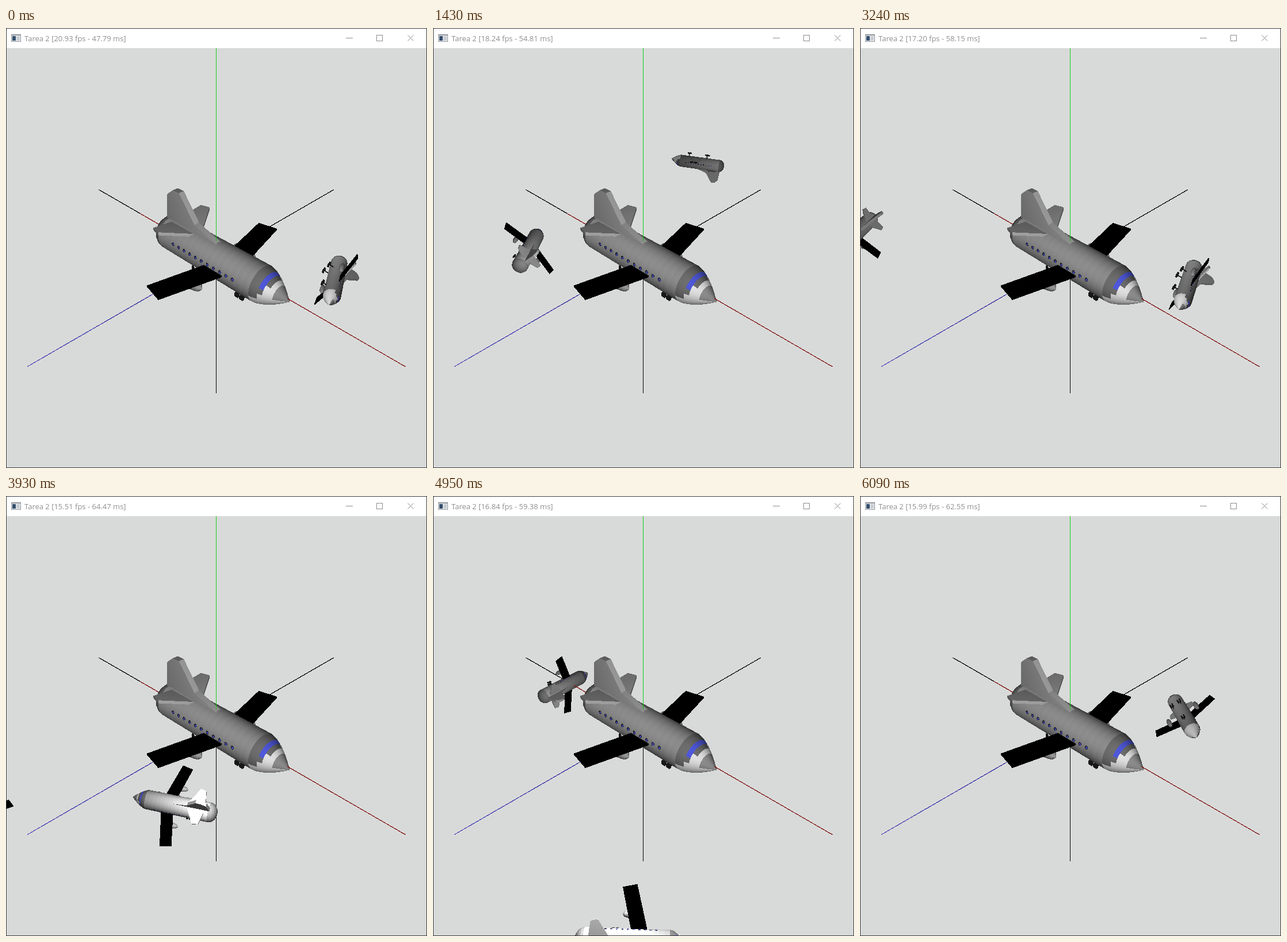
Write an HTML page with a canvas that moves like this. It is 732 px wide and 765 px high and loops after 6.14 s.

```html
<!DOCTYPE html>
<html lang="es">
<head>
<meta charset="utf-8">
<title>Tarea 2</title>
<style>
  html, body { margin: 0; width: 100%; height: 100%; overflow: hidden; background: #fff; }
  canvas { display: block; }
</style>
</head>
<body>
<canvas id="stage" width="732" height="765"></canvas>
<script>
const W = 732, H = 765, TOP = 35, LOOP = 6140;
const ctx = document.getElementById('stage').getContext('2d');

// ---------- helpers ----------
const sub = (a, b) => a.map((v, i) => v - b[i]);
const dot = (a, b) => a[0] * b[0] + a[1] * b[1] + a[2] * b[2];
const cross = (a, b) => [a[1] * b[2] - a[2] * b[1], a[2] * b[0] - a[0] * b[2], a[0] * b[1] - a[1] * b[0]];
const unit = a => { const l = Math.hypot(...a) || 1; return a.map(v => v / l); };
const rad = d => d * Math.PI / 180;
const mix = (a, b, u) => a + (b - a) * u;
const sample = (n, fn) => Array.from({ length: n + 1 }, (_, i) => fn(i / n));

// ---------- plane model: x forward, y up, z sideways ----------
const gray = (v, ambient) => ({ rgb: [v, v, v], ambient });
const BLACK = gray(0, 1), TYRE = gray(18, 1), METAL = gray(150, .3), TAIL = gray(190, .3);
const DARK = gray(90, .4), LIGHT = gray(165, .55), TIP = gray(110, .5);
const BLUE = { rgb: [52, 58, 142], ambient: .7 };
const mesh = [];

function face(pts, normals, color) {
  for (let i = 2; i < pts.length; i++) {
    mesh.push({ p: [pts[0], pts[i - 1], pts[i]], n: [normals[0], normals[i - 1], normals[i]], color });
  }
}

// Solid between two matching outlines, flat shaded
function prism(lower, upper, color) {
  const all = [...lower, ...upper];
  const mid = [0, 1, 2].map(k => all.reduce((s, p) => s + p[k], 0) / all.length);
  const flat = pts => {
    let n = unit(cross(sub(pts[1], pts[0]), sub(pts[2], pts[0])));
    if (dot(n, sub(pts[0], mid)) < 0) n = n.map(v => -v);
    face(pts, pts.map(() => n), color);
  };
  flat(lower);
  flat(upper);
  lower.forEach((p, i) => {
    const j = (i + 1) % lower.length;
    flat([p, lower[j], upper[j], upper[i]]);
  });
}

// Outline thickened along one axis
function slab(outline, axis, below, above, color) {
  const shifted = d => outline.map(p => p.map((v, k) => k === axis ? v + d : v));
  prism(shifted(-below), shifted(above), color);
}

function box([x, y, z], [a, b, c], color) {
  slab([[x - a, y, z - c], [x + a, y, z - c], [x + a, y, z + c], [x - a, y, z + c]], 1, b, b, color);
}

// Surface of revolution along x; rings are [x, radius, y]
function lathe(rings, colorOf, z = 0, sides = 36) {
  for (let i = 0; i + 1 < rings.length; i++) {
    const [A, B] = [rings[i], rings[i + 1]];
    const slope = (B[1] - A[1]) / (B[0] - A[0]);
    const at = (q, a) => [q[0], q[2] + q[1] * Math.cos(a), z + q[1] * Math.sin(a)];
    const normal = a => unit([-slope, Math.cos(a), Math.sin(a)]);
    for (let s = 0; s < sides; s++) {
      const [a, m, b] = [s, s + .5, s + 1].map(v => rad(v * 360 / sides - 180));
      face([at(A, a), at(B, a), at(B, b), at(A, b)],
        [normal(a), normal(a), normal(b), normal(b)], colorOf(i, Math.abs(m) * 180 / Math.PI));
    }
  }
}

function porthole(x, side, lift, size, color) {
  const a = rad(78), n = [0, Math.cos(a), side * Math.sin(a)], t = [0, -Math.sin(a), side * Math.cos(a)];
  const pts = sample(8, u => {
    const c = size * Math.cos(u * 2 * Math.PI), s = size * Math.sin(u * 2 * Math.PI);
    return [x + c, n[1] * lift + t[1] * s, n[2] * lift + t[2] * s];
  });
  face(pts, pts.map(() => n), color);
}

function noseColor(ring, angle) {
  if (ring < 2) return angle < 105 ? DARK : LIGHT;
  if (ring === 2) return angle < 58 ? BLUE : angle < 85 ? DARK : LIGHT;
  if (ring === 3) return angle < 45 ? DARK : LIGHT;
  return ring === 4 || angle > 90 ? LIGHT : TIP;
}

function buildPlane() {
  lathe(sample(6, u => [-2.3 - .5 * Math.cos(u * Math.PI / 2), .65 * Math.sin(u * Math.PI / 2), 0]), () => METAL);
  lathe(sample(16, u => [mix(-2.3, 2.05, u), .65, 0]), i => gray(mix(205, 135, i / 15), .3));
  lathe(sample(8, u => [mix(2.05, 3.18, u), .65 * (1 - u ** 1.5), -.08 * u]), noseColor);

  slab([[-2.4, .5, 0], [-2.32, 1.6, 0], [-2, 1.87, 0], [-1.68, 1.88, 0], [-.95, .95, 0], [-.9, .5, 0]], 2, .11, .11, TAIL);
  slab([[-1, .5, 0], [-1, .95, 0], [.17, .62, 0], [.17, .5, 0]], 2, .11, .11, TAIL);

  for (const side of [-1, 1]) {
    slab([[.96, .02, .4 * side], [.33, .02, 2.84 * side], [-.42, .02, 2.68 * side], [.12, .02, .4 * side]], 1, .03, .03, BLACK);
    slab([[-.9, .58, .2 * side], [-1.55, .8, 1.2 * side], [-1.92, .78, 1.12 * side], [-2.05, .58, .2 * side]], 1, .06, .06, TAIL);
    lathe(sample(8, u => [mix(-.42, .65, u), .2 * Math.sin(u * Math.PI) ** .4, -.3]), () => METAL, side * 1.3, 14);
    for (let i = 0; i < 11; i++) {
      porthole(-1.5 + i * .286, side, .656, .066, TYRE);
      porthole(-1.485 + i * .286, side, .664, .045, BLUE);
    }
  }

  for (const [x, z] of [[1.2, 0], [-.8, .36], [-.8, -.36]]) {
    box([x, -.76, z], [.03, .2, .03], TYRE);
    for (const dx of [-.11, .11]) for (const dz of [-.1, .1]) box([x + dx, -.95, z + dz], [.075, .075, .05], TYRE);
  }
}

// ---------- depth-buffered renderer ----------
const image = ctx.createImageData(W, H);
const pixels = new Uint32Array(image.data.buffer);
const depth = new Float32Array(W * H);
const LIGHT_POS = [5, 5, 5];
const pack = (r, g, b) => (255 << 24 | Math.min(255, b) << 16 | Math.min(255, g) << 8 | Math.min(255, r)) >>> 0;

// Camera at (10, 10, 10) looking at the origin, 45 degree field of view
function project([x, y, z]) {
  const near = 1 / (Math.sqrt(300) - (x + y + z) / Math.sqrt(3));
  const s = 881.2 * near;
  return [365.7 + s * (x - z) / Math.SQRT2, 399 - s * (2 * y - x - z) / Math.sqrt(6), near];
}

function plot(x, y, near, color) {
  if (x < 1 || x > W - 2 || y < TOP || y > H - 2) return;
  const i = y * W + x;
  if (near > depth[i]) { depth[i] = near; pixels[i] = color; }
}

function shade(p, n, ambient) {
  const toLight = sub(LIGHT_POS, p), d = Math.hypot(...toLight);
  return ambient + Math.max(0, dot(n, toLight) / d) / (.1 * d + .01 * d * d);
}

function triangle(a, b, c, rgb) {
  const area = (b[0] - a[0]) * (c[1] - a[1]) - (b[1] - a[1]) * (c[0] - a[0]);
  if (!area) return;
  const x0 = Math.ceil(Math.min(a[0], b[0], c[0]) - .5), x1 = Math.max(a[0], b[0], c[0]) - .5;
  const y0 = Math.ceil(Math.min(a[1], b[1], c[1]) - .5), y1 = Math.max(a[1], b[1], c[1]) - .5;
  for (let y = y0; y <= y1; y++) for (let x = x0; x <= x1; x++) {
    const px = x + .5, py = y + .5;
    const u = ((b[0] - px) * (c[1] - py) - (b[1] - py) * (c[0] - px)) / area;
    const v = ((c[0] - px) * (a[1] - py) - (c[1] - py) * (a[0] - px)) / area;
    const w = 1 - u - v;
    if (u < 0 || v < 0 || w < 0) continue;
    const k = u * a[3] + v * b[3] + w * c[3];
    plot(x, y, u * a[2] + v * b[2] + w * c[2], pack(rgb[0] * k, rgb[1] * k, rgb[2] * k));
  }
}

function drawPlane(pos, forward, up, scale) {
  const side = cross(forward, up);
  const turn = v => [0, 1, 2].map(i => v[0] * forward[i] + v[1] * up[i] + v[2] * side[i]);
  for (const { p, n, color } of mesh) {
    const corners = p.map((q, i) => {
      const at = turn(q).map((v, k) => pos[k] + scale * v);
      return [...project(at), shade(at, turn(n[i]), color.ambient)];
    });
    triangle(...corners, color.rgb);
  }
}

// Circular flight around the y axis; the roll equals the orbit angle
function drawOrbiter(radius, angle, direction) {
  const c = Math.cos(angle), s = Math.sin(angle);
  drawPlane([radius * c, 0, radius * s], [-s * direction, 0, c * direction], [c * c, s, c * s], .42);
}

function drawAxis(axis, colorAt) {
  for (let i = 0; i <= 3000; i++) {
    const t = i / 1500 - 1, p = [0, 0, 0];
    p[axis] = 7 * t;
    const [x, y, near] = project(p);
    plot(Math.floor(x), Math.floor(y), near, colorAt(t));
  }
}

// ---------- still part of the scene ----------
buildPlane();
pixels.fill(pack(216, 218, 217));
drawAxis(0, t => { const k = t < -.6 ? 0 : 1; return pack(128 * k, 18 * k, 18 * k); });
drawAxis(1, t => t > 0 ? pack(20, 205, 20) : pack(0, 0, 0));
drawAxis(2, t => t < 0 ? pack(0, 0, 0) : pack(36 + 36 * t, 32 + 36 * t, 140 + 45 * t));
drawPlane([0, 0, 0], [1, 0, 0], [0, 1, 0], 1);
const stillPixels = pixels.slice(), stillDepth = depth.slice();

// ---------- timing: [ms, orbit angle in degrees, render cost in ms] ----------
const TICK = 67.5, TITLE_REFRESH = 560;
const keys = [[0, 18, 47.786], [860, 123.3, 58.72], [1430, 187.2, 54.81], [2510, 304.7, 54.04],
  [3930, 466, 64.47], [4950, 580.5, 59.38], [6090, 711.6, 62.55], [LOOP, 717, 62.55]];

// The scene advances in even ticks between two key times
function stateAt(clock) {
  const i = keys.findIndex(k => k[0] > clock);
  const [t0, angle0, cost0] = keys[i - 1], [t1, angle1, cost1] = keys[i];
  const span = t1 - t0, ticks = Math.max(1, Math.round(span / TICK));
  const u = Math.floor((clock - t0) / span * ticks) / ticks;
  const refreshed = Math.floor(u * span / TITLE_REFRESH) * TITLE_REFRESH / span;
  return { angle: mix(angle0, angle1, u), cost: mix(cost0, cost1, refreshed) };
}

// ---------- window frame ----------
function stroke(color, ...lines) {
  ctx.strokeStyle = color;
  ctx.lineWidth = 1;
  ctx.beginPath();
  for (const [x0, y0, x1, y1] of lines) { ctx.moveTo(x0, y0); ctx.lineTo(x1, y1); }
  ctx.stroke();
}

function rect(color, x, y, w, h) {
  ctx.fillStyle = color;
  ctx.fillRect(x, y, w, h);
}

function drawWindow(cost) {
  rect('#fff', 1, 1, W - 2, TOP - 1);
  ctx.strokeStyle = '#3a3c3e';
  ctx.lineWidth = 1;
  ctx.strokeRect(.5, .5, W - 1, H - 1);

  rect('#8d9298', 9, 11, 17, 13);
  rect('#f4f6f8', 10, 13, 15, 10);
  rect('#36506e', 11, 14, 6, 8);
  rect('#c9ced3', 18, 14, 6, 8);

  ctx.fillStyle = '#8f8f8f';
  ctx.font = '13px "Open Sans", "Noto Sans", sans-serif';
  ctx.fillText(`Tarea 2 [${(1000 / cost).toFixed(2)} fps - ${cost.toFixed(2)} ms]`, 32, 22.5);

  stroke('#8c8c8c', [591, 17.5, 603, 17.5], [698.5, 12.5, 708.5, 22.5], [708.5, 12.5, 698.5, 22.5]);
  ctx.strokeRect(644.5, 12.5, 10, 10);
}

// ---------- loop ----------
let shown;
function frame(now) {
  const { angle, cost } = stateAt(now % LOOP);
  if (angle !== shown) {
    shown = angle;
    pixels.set(stillPixels);
    depth.set(stillDepth);
    drawOrbiter(4.03, rad(angle - 45), 1);
    drawOrbiter(8, rad(337.4 - angle / 2), -1);
    ctx.putImageData(image, 0, 0);
    drawWindow(cost);
  }
  requestAnimationFrame(frame);
}
frame(0);
</script>
</body>
</html>
```
